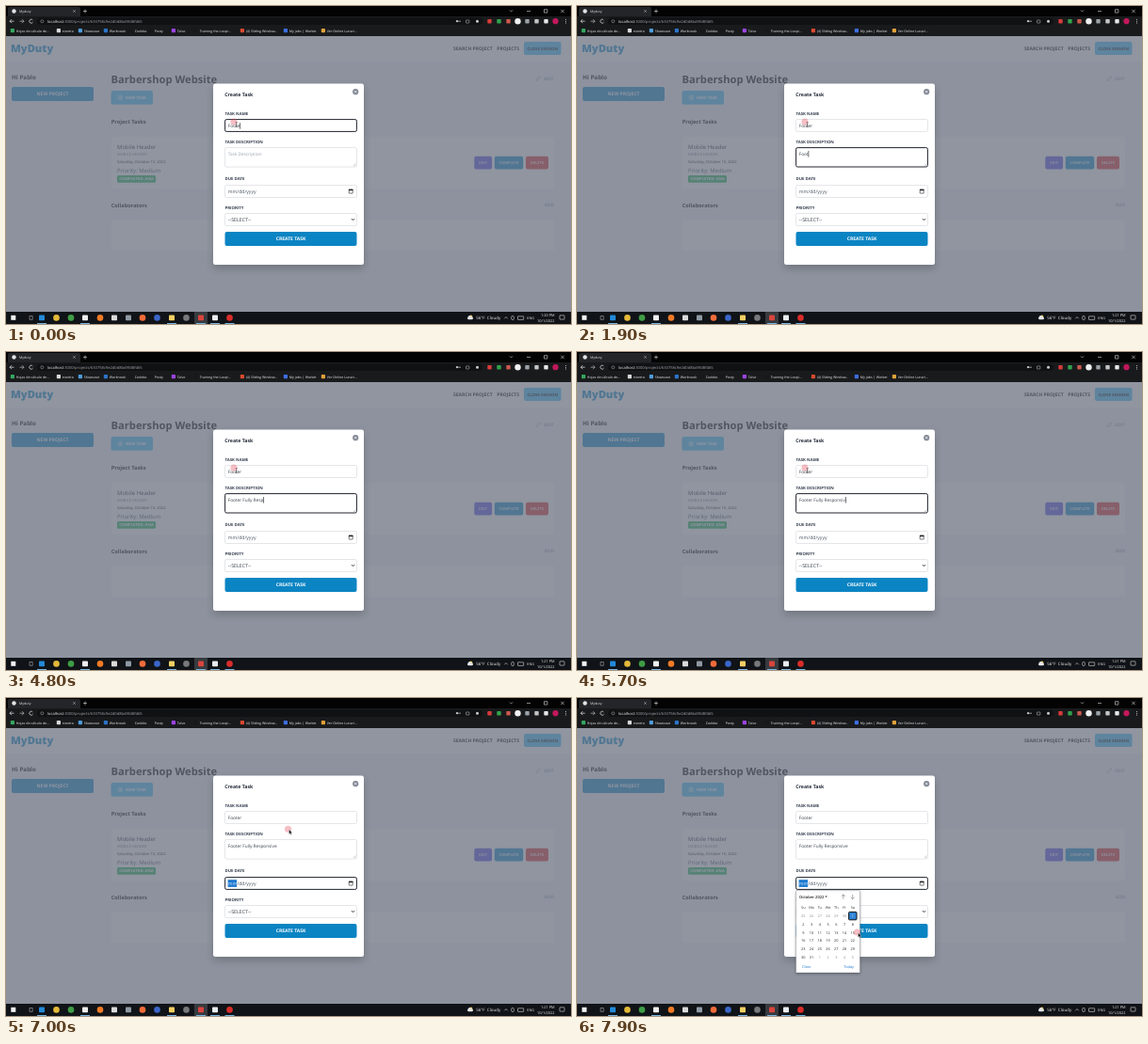
An HTML page with a canvas for the animation above (8 s loop, 600 by 338 pixels).

```html
<!DOCTYPE html>
<html lang="en">
<head>
<meta charset="utf-8">
<title>Create Task</title>
<style>
html, body { margin: 0; width: 100%; height: 100%; overflow: hidden; background: #8d929d; }
canvas { display: block; width: 600px; height: 338px; }
</style>
</head>
<body>
<canvas id="stage"></canvas>
<script>
const LOOP = 8000, STEP = 100;
const canvas = document.getElementById('stage');
const ctx = canvas.getContext('2d');
const ratio = window.devicePixelRatio || 1;
canvas.width = 600 * ratio;
canvas.height = 338 * ratio;
ctx.scale(ratio, ratio);
ctx.textRendering = 'geometricPrecision';

const FACE = '"Open Sans", "Noto Sans", sans-serif';
const SKY = '#0284c7', PALE = '#38bdf8', INK = '#374151', GRAY = '#9ca3af', LINE = '#d3d6dc';

function text(str, x, cy, size, color, weight = 400, align = 'left') {
  ctx.font = `${weight} ${size}px ${FACE}`;
  ctx.fillStyle = color;
  ctx.textAlign = align;
  ctx.fillText(str, x, cy + size * 0.357);
  return ctx.measureText(str).width;
}
function rect(x, y, w, h, color) {
  ctx.fillStyle = color;
  ctx.fillRect(x, y, w, h);
}
function box(x, y, w, h, r, fill, stroke, width = 0.6) {
  ctx.beginPath();
  ctx.roundRect(x, y, w, h, r);
  if (fill) { ctx.fillStyle = fill; ctx.fill(); }
  if (stroke) { ctx.strokeStyle = stroke; ctx.lineWidth = width; ctx.stroke(); }
}
function shadowed(alpha, blur, dy, paint) {
  ctx.save();
  ctx.shadowColor = `rgba(0,0,0,${alpha})`;
  ctx.shadowBlur = blur * ratio;
  ctx.shadowOffsetY = dy * ratio;
  paint();
  ctx.restore();
}
function disc(x, y, r, color) {
  ctx.beginPath();
  ctx.arc(x, y, r, 0, 7);
  ctx.fillStyle = color;
  ctx.fill();
}
function path(points, color, width = 0.6) {
  ctx.beginPath();
  for (let i = 0; i < points.length; i += 2) ctx.lineTo(points[i], points[i + 1]);
  ctx.strokeStyle = color;
  ctx.lineWidth = width;
  ctx.stroke();
}
function cross(x, y, r, color, width) {
  path([x - r, y - r, x + r, y + r], color, width);
  path([x - r, y + r, x + r, y - r], color, width);
}
function button(label, x, y, w, h, fill, color, size, weight = 700) {
  box(x, y, w, h, 2, fill);
  text(label, x + w / 2, y + h / 2, size, color, weight, 'center');
}

const bookmarks = [
  [5, '#35a560', 'Hojas de cálculo de...'], [54, '#d8d8d8', 'storeto'],
  [77, '#4f9bd8', 'Showcase'], [104, '#2b74c8', 'Worknook'],
  [131, '#18181a', 'Codeko'], [152, '#18181a', 'Posty'],
  [176, '#9b45e0', 'Talvo'], [200, '#18181a', 'Training the Loopi...'],
  [249, '#d84a2f', '(4) Sliding Window...'], [295, '#3c6fe0', 'My jobs | Worket'],
  [335, '#e0a03a', 'Ver Online Lunari...']
];

function browser() {
  rect(0, 0, 600, 12, '#030303');
  box(2, 1, 77, 14, 2, '#242528');
  rect(0, 11, 600, 21, '#191a1c');
  disc(8.5, 5.5, 2.2, '#e4e4e4');
  text('Myduty', 14, 5.5, 3.6, '#e6e6e6');
  cross(72.5, 5.5, 1.2, '#ddd', 0.5);
  path([82, 5.5, 86, 5.5], '#ddd');
  path([84, 3.5, 84, 7.5], '#ddd');
  path([535, 4.5, 536.5, 6, 538, 4.5], '#ddd');
  path([553, 5.5, 557, 5.5], '#ddd');
  box(571.5, 3.7, 3.4, 3.4, 0, null, '#ddd');
  cross(591, 5.5, 1.7, '#ddd', 0.6);

  path([8.5, 16.2, 4, 16.2, 6, 14.2], '#eee', 0.7);
  path([4, 16.2, 6, 18.2], '#eee', 0.7);
  path([14.5, 16.2, 19, 16.2, 17, 14.2], '#bbb', 0.7);
  path([19, 16.2, 17, 18.2], '#bbb', 0.7);
  ctx.beginPath();
  ctx.arc(26.8, 16.2, 2, 0.5, 5.5);
  ctx.strokeStyle = '#eee';
  ctx.stroke();
  box(33, 12.5, 473, 7.6, 3.8, '#101113');
  box(36.8, 14.8, 3, 3, 1.5, null, '#bbb', 0.5);
  const w = text('localhost', 44, 16.2, 4.1, '#f4f4f4');
  text(':3000/projects/633758c9e2d0d8bd9fd8fd65', 44 + w, 16.2, 4.1, '#a4a6aa');
  disc(479, 16.2, 1.1, '#ccc');
  path([480, 16.2, 483, 16.2], '#ccc', 0.7);
  box(488.5, 15, 3.4, 3, 0.4, null, '#ccc', 0.5);
  disc(500.5, 16.2, 1.5, '#ccc');
  ['#d63b3b', '#31a24c', '#c9584e', '#f0f0f0', '#9ca3a8', '#c4c4c4', '#e7e7e7'].forEach((c, i) => {
    const x = 513.5 + i * 10;
    if (i === 3) disc(x, 16.2, 3.2, c);
    else box(x - 2.2, 14, 4.4, 4.4, 0.7, c);
  });
  disc(583.5, 16.2, 3.1, '#c2185b');
  for (let i = -1; i < 2; i++) disc(594.5, 16.2 + i * 1.7, 0.5, '#ddd');

  for (const [x, color, label] of bookmarks) {
    box(x - 0.2, 24, 4.2, 4.2, 0.8, color);
    text(label, x + 5.8, 26.3, 3.6, '#eeeff1');
  }
}

// Painted in full colour, then dimmed by the modal backdrop
function page() {
  rect(0, 32, 600, 293, '#f3f4f6');
  rect(0, 32, 600, 27.5, '#fff');
  text('MyDuty', 5, 45.5, 11.2, SKY, 800);
  text('SEARCH PROJECT', 475, 45.5, 5, '#000', 700);
  text('PROJECTS', 521.3, 45.5, 5, '#000', 700);
  button('CLOSE SESSION', 550, 38, 39.5, 14, PALE, '#000', 4.35);

  text('Hi Pablo', 6, 76, 6.3, '#000', 700);
  button('NEW PROJECT', 6, 86, 87, 15, SKY, '#fff', 5);

  text('Barbershop Website', 111.5, 78.5, 11.2, '#000', 700);
  box(111.5, 90, 44.5, 14.8, 2, PALE);
  box(119, 95.2, 4.6, 4.6, 2.3, null, '#fff');
  path([120, 97.5, 122.6, 97.5], '#fff', 0.5);
  path([121.3, 96.2, 121.3, 98.8], '#fff', 0.5);
  text('NEW TASK', 127, 97.5, 4.4, '#fff', 700);
  path([562.8, 79.5, 563.3, 77.8, 566.6, 74.8, 567.8, 76, 564.5, 79.1, 562.8, 79.5], GRAY, 0.6);
  text('EDIT', 571.2, 77.5, 4.7, GRAY, 700);

  text('Project Tasks', 111.7, 122.5, 5.7, '#000', 700);
  box(112, 139, 470, 55, 2, '#fff');
  text('Mobile Header', 118, 150, 6, '#111827');
  text('MOBILE HEADER', 118, 158, 4.05, '#6b7280');
  text('Saturday, October 15, 2022', 118, 166, 4.1, '#000');
  text('Priority: Medium', 118, 175, 5.95, '#374151');
  box(118, 180, 41, 7.8, 1.5, '#16b455');
  text('COMPLETED: ANA', 138.5, 183.9, 4.2, '#fff', 700, 'center');
  button('EDIT', 497.3, 159.8, 18.8, 13.6, '#4f46e5', '#fff', 4.1, 600);
  button('COMPLETE', 518.8, 159.8, 30.4, 13.6, SKY, '#fff', 4.1, 600);
  button('DELETE', 552, 159.8, 24, 13.6, '#dc2626', '#fff', 4.1, 600);

  text('Collaborators', 111.7, 211.5, 5.65, '#000', 700);
  text('ADD', 582, 211.5, 4.7, GRAY, 700, 'right');
  box(112, 227, 470, 33.5, 2, '#fff');
  text('There Are No Collaborators', 347, 244, 5.25, '#000', 400, 'center');
  rect(0, 32, 600, 293, 'rgba(107,114,128,.75)');
}

const taskIcons = [
  [38, '#2389d7'], [53.5, '#e4b93a'], [69, '#3f9d45'], [84, '#eeeeee'], [100, '#f07b28'],
  [115, '#dadada'], [130, '#8f99a3'], [145, '#f26b3a'], [160.5, '#3b66c9'], [176, '#f2cf63'],
  [191.5, '#77797b'], [207, '#d8453e'], [222, '#e9edf0'], [237.5, '#d92d2b']
];

function taskbar(t) {
  rect(0, 325, 600, 13, '#101317');
  rect(5.3, 328.8, 5, 5, '#f4f4f4');
  box(25, 329.5, 3.2, 3.8, 0, null, '#ccc', 0.5);
  taskIcons.forEach(([x, color], i) => {
    if (i === 11) rect(x - 7, 325, 14, 13, '#373a3e');
    if (i % 3 === 1 || i === 2 || i === 8) disc(x, 331.4, 3.3, color);
    else box(x - 3, 328.5, 6, 5.8, 0.8, color);
    if ([0, 3, 9, 11, 12, 13].includes(i)) rect(x - 5, 337, 10, 1, '#78b5e2');
  });
  disc(493.8, 330, 1.6, '#f2c14b');
  box(490, 330.3, 6, 3, 1.5, '#e2e5e8');
  disc(492.5, 330.8, 1.8, '#e2e5e8');
  text('56°F  Cloudy', 499.3, 331.5, 4.45, '#eee');
  path([529.3, 332.3, 531, 330.5, 532.7, 332.3], '#ddd');
  box(536.7, 329.5, 2.6, 4, 1, null, '#ddd');
  box(543.5, 329.8, 6.2, 3.6, 0.4, null, '#ddd');
  text('ENG', 553.3, 331.5, 3.8, '#eee');
  text(t < 1600 ? '1:20 PM' : '1:21 PM', 582.5, 328.7, 3.9, '#eee', 400, 'right');
  text('10/1/2022', 582.5, 334.5, 3.9, '#eee', 400, 'right');
  box(588, 328.8, 5, 4.3, 0.4, null, '#ddd');
}

// Typing: [time, letters shown from then on]
const FULL = 'Footer Fully Responsive';
const keys = [[700, 1], [1400, 2], [1500, 3], [1900, 4], [2000, 5], [2100, 6], [2400, 7],
  [3600, 8], [3700, 9], [4000, 11], [4100, 12], [4300, 13], [4500, 14], [4600, 15], [4800, 17],
  [5000, 18], [5200, 19], [5400, 20], [5500, 21], [5700, 22], [5800, 23]];

function field(y, h, focused) {
  if (focused) box(232.6, y + 0.1, 139.8, h - 0.2, 1.6, '#fff', '#20242d', 1);
  else box(232.5, y, 140, h, 1.6, '#fff', LINE);
}
function typed(str, cy, last, t, focused) {
  const w = text(str, 235.7, cy, 4.73, '#3a404b');
  if (focused && (t - last) % 1000 < 500) rect(235.8 + w, cy - 3.2, 0.6, 6.6, '#111');
}

function modal(t) {
  shadowed(0.2, 8, 4, () => box(220, 82.5, 160, 192.5, 2.5, '#fff'));
  disc(371.2, 91.2, 3.1, '#858b97');
  cross(371.2, 91.2, 1.1, '#fff', 0.7);
  text('Create Task', 232.3, 94.2, 5.2, '#1f2735', 700);
  [['TASK NAME', 114.3], ['TASK DESCRIPTION', 144.4], ['DUE DATE', 183.7], ['PRIORITY', 214.4]]
    .forEach(([label, y]) => text(label, 232.5, y, 4.35, INK, 700));

  const onName = t < 400, onDate = t >= 6100, onNote = !onName && !onDate;
  field(120.5, 13, onName);
  typed(t < 100 ? 'Foote' : 'Footer', 127.3, t < 100 ? 0 : 100, t, onName);

  field(150.5, 20.6, onNote);
  const [last, count] = keys.filter(k => k[0] <= t).pop() || [400, 0];
  if (!count) text('Task Description', 235.7, 157.2, 4.73, GRAY);
  typed(FULL.slice(0, count), 157.2, last, t, onNote);
  path([369, 170, 371.5, 167.5], '#888', 0.4);
  path([370.4, 170, 371.5, 168.9], '#888', 0.4);

  field(190.5, 13, onDate);
  if (onDate) rect(235.6, 193.2, 9.5, 7.7, '#1b78d0');
  const w = text('mm', 235.8, 197, 5.1, onDate ? '#dcebfa' : '#4b5563');
  text('/dd/yyyy', 235.8 + w, 197, 5.1, '#4b5563');
  box(364.2, 195.1, 4, 4, 0.3, null, '#222', 0.6);
  rect(364, 194.8, 4.4, 1.4, '#222');

  field(220.5, 13, false);
  text('--SELECT--', 235.7, 227, 5.35, '#3a404b');
  path([367.2, 226.2, 368.6, 227.6, 370, 226.2], '#222', 1);
  button('CREATE TASK', 232.5, 240, 140, 15, '#0b84c3', '#fff', 5);
}

function calendar(t) {
  if (t < 7500) return;
  const open = t >= 7600, edge = 'rgba(70,75,85,.45)';
  shadowed(0.35, 3, 1, () => box(232.5, 204.5, 68, 87.5, 0.6, open && '#fff', edge, 0.5));
  if (!open) return;

  const w = text('October 2022', 236, 211.3, 4.1, '#222', 600);
  ctx.beginPath();
  ctx.moveTo(237 + w, 210.6);
  ctx.lineTo(239.4 + w, 210.6);
  ctx.lineTo(238.2 + w, 212);
  ctx.fill();
  [[282.8, -1], [292.7, 1]].forEach(([x, d]) => {
    path([x, 211.3 - d * 2.4, x, 211.3 + d * 2.4], '#555', 0.5);
    path([x - 2, 211.3 + d * 0.5, x, 211.3 + d * 2.4, x + 2, 211.3 + d * 0.5], '#555', 0.5);
  });
  const colX = c => 240.3 + c * 8.75;
  ['Su', 'Mo', 'Tu', 'We', 'Th', 'Fr', 'Sa']
    .forEach((d, c) => text(d, colX(c), 222.5, 3.85, '#333', 400, 'center'));
  box(288.6, 227.4, 8.4, 8.4, 0.8, '#2f83d5', '#101010', 1);
  for (let i = 0; i < 42; i++) {
    const day = i - 5, inside = day > 0 && day < 32;
    const label = day < 1 ? day + 30 : day > 31 ? day - 31 : day;
    const color = day === 1 ? '#fff' : inside ? '#222' : '#8c8c8c';
    text(String(label), colX(i % 7), 231.7 + Math.floor(i / 7) * 8.76, 3.85, color, 400, 'center');
  }
  text('Clear', 239, 285.2, 3.9, '#1b78d0');
  text('Today', 294, 285.2, 3.9, '#1b78d0', 400, 'right');
}

const smooth = p => p * p * (3 - 2 * p);
const clamp = p => Math.min(1, Math.max(0, p));
const bend = (a, b, c, u) => a * (1 - u) * (1 - u) + 2 * b * u * (1 - u) + c * u * u;

function pointer(t) {
  const u = smooth(clamp((t - 6500) / 900)), v = smooth(clamp((t - 7500) / 400));
  const x = bend(242, 275, 364, u) - 66.5 * v;
  const y = bend(123, 104, 198, u) + 51 * v;
  const pressed = t >= 7400 && t < 7600;
  if (pressed) disc(x, y, 4.8, '#cd1029');
  else disc(x, y, 3.6, 'rgba(228,70,90,.35)');
  if (t < 6600) {
    const ix = x + 2.7, iy = y + 3;
    path([ix, iy - 2.4, ix, iy + 2.4], '#222', 0.5);
    path([ix - 1, iy - 2.4, ix + 1, iy - 2.4], '#222', 0.4);
    path([ix - 1, iy + 2.4, ix + 1, iy + 2.4], '#222', 0.4);
    return;
  }
  ctx.save();
  ctx.translate(x + 1, y + 0.6);
  ctx.beginPath();
  [[0, 0], [0, 5], [1.2, 4], [2, 5.6], [2.8, 5.2], [2, 3.6], [3.5, 3.5]].forEach(p => ctx.lineTo(...p));
  ctx.closePath();
  ctx.fillStyle = '#111';
  ctx.fill();
  ctx.strokeStyle = '#fff';
  ctx.lineWidth = 0.35;
  ctx.stroke();
  ctx.restore();
}

const start = performance.now();
function draw() {
  const t = Math.floor(((performance.now() - start) % LOOP) / STEP) * STEP;
  page();
  browser();
  taskbar(t);
  modal(t);
  calendar(t);
  pointer(t);
  requestAnimationFrame(draw);
}
draw();
</script>
</body>
</html>
```
